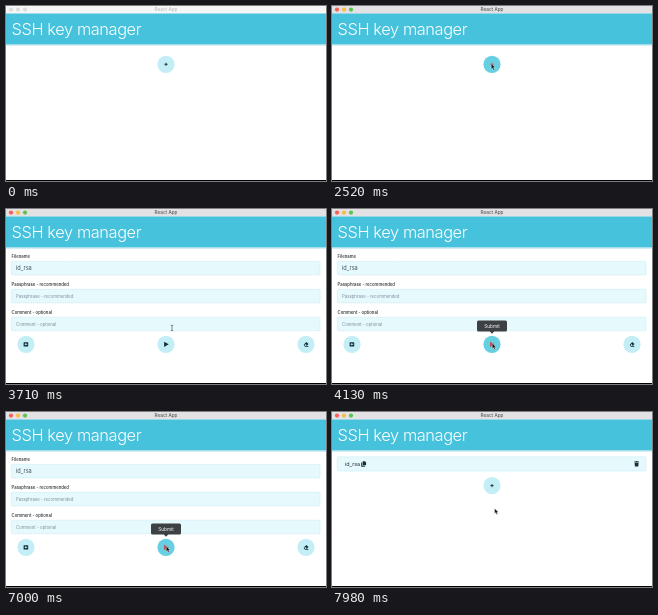
These frames come from a looping animation (320 px wide and 175 px high, 8000 ms). An HTML page:

```html
<!DOCTYPE html>
<html lang="en">
<head>
<meta charset="utf-8">
<title>SSH key manager</title>
<style>
  html, body { margin: 0; width: 100%; height: 100%; overflow: hidden; background: #fff; }
  svg { display: block; width: 100vw; height: 100vh; }
  text { font-family: Inter, "Liberation Sans", sans-serif; fill: #25292c; }
  .title { font-size: 16.4px; font-weight: 300; letter-spacing: -.42px; fill: #fff; }
  .label { font-size: 4.25px; font-weight: 500; }
  .hint { font-size: 4.3px; fill: #7f9097; }
  .value { font-size: 5.6px; fill: #42525a; }
  .box { fill: #e6f9fd; stroke: #b5e5ee; stroke-width: .6; stroke-dasharray: 1.2 .8; }
  .btn { fill: #c3eef6; }
  .ink { fill: #12303b; }
</style>
</head>
<body>
<svg viewBox="0 0 320 175" preserveAspectRatio="none">
  <defs>
    <linearGradient id="shade" x1="0" y1="0" x2="0" y2="1">
      <stop offset="0" stop-color="#a9dce8"/>
      <stop offset="1" stop-color="#fff"/>
    </linearGradient>
  </defs>
  <rect width="320" height="175" fill="#fff"/>
  <rect id="bar" width="320" height="7.5"/>
  <g id="lights"></g>
  <text id="caption" x="160" y="5.4" text-anchor="middle" font-size="4.7"></text>
  <rect y="7.5" width="320" height="31" fill="#47c2dc"/>
  <rect y="38.5" width="320" height="2" fill="url(#shade)"/>
  <text class="title" x="5.6" y="29.3">SSH key manager</text>

  <g id="form">
    <g id="fields"></g>
    <circle class="btn" cx="20" cy="135.3" r="8.6"/>
    <rect class="ink" x="17.6" y="133.2" width="4.6" height="4.2" rx=".5"/>
    <path d="M18.5 135.3l1.5-1.2v.7h1.3v1h-1.3v.7z" fill="#c3eef6"/>
    <circle id="submit" cx="160" cy="135.3" r="8.6"/>
    <path id="play" d="M158.1 132.7l4.6 2.6-4.6 2.6z"/>
    <circle class="btn" cx="300" cy="135.3" r="8.6"/>
    <path class="ink" d="M297.7 135.8l2.6-2.7 2.2 2-1.8 1.9h1.7v.7h-3.4z"/>
    <path d="M298.6 135.8l.8-.8 1.3 1.2-.8.8h-.5z" fill="#c3eef6"/>
    <g id="tip">
      <path d="M146.5 111.5h27q1.5 0 1.5 1.5v8q0 1.5-1.5 1.5h-11.3l-2.2 2.3-2.2-2.3h-11.3q-1.5 0-1.5-1.5v-8q0-1.5 1.5-1.5z" fill="#3d4144"/>
      <text x="160" y="118.8" text-anchor="middle" font-size="4.75" style="fill:#fff">Submit</text>
    </g>
  </g>

  <g id="row">
    <rect class="box" x="5.3" y="44.8" width="308.8" height="14.2" rx="1"/>
    <text class="value" x="13" y="53.8" style="font-size:5.4px;fill:#25292c">id_rsa</text>
    <path class="ink" d="M30.7 49.2h2.2l1.2 1.2v2.9h-3.4zM29.2 50.4h1v3.4h2.7v.9h-3.7z"/>
    <path class="ink" d="M302.2 49.5h1.4l.4-.6h1.2l.4.6h1.4v.8h-4.8zM302.6 50.7h4l-.3 3.9h-3.4z"/>
  </g>
  <g id="add">
    <circle id="addFace" r="8.6"/>
    <path id="plus" d="M-1.6 0h3.2M0-1.6v3.2" stroke-width=".9"/>
  </g>

  <path id="arrow" d="M0 0v5.3l1.2-1.1.9 2 1-.4-.9-2h1.7z" fill="#111" stroke="#fff" stroke-width=".35"/>
  <path id="beam" d="M-1.2-2.8q1.2 0 1.2.7v4.2q0 .7-1.2.7M1.2-2.8q-1.2 0-1.2.7M1.2 2.8q-1.2 0-1.2-.7" fill="none" stroke="#30383c" stroke-width=".6"/>
  <rect y="174" width="320" height="1" fill="#000"/>
</svg>
<script>
const LOOP = 8000, STEP = 70;
const FIELDS = [
  ["Filename", "id_rsa", "value"],
  ["Passphrase - recommended", "Passphrase - recommended", "hint"],
  ["Comment - optional", "Comment - optional", "hint"]
];
// time, x, y of the pointer tip
const PATH = [
  [490, 162.5, 162], [770, 160.5, 78], [980, 160.5, 77.5], [1540, 159.3, 56],
  [2660, 159.3, 57.8], [3080, 159.3, 57.8], [3430, 168, 84], [3710, 166, 119],
  [3920, 160.3, 134.4], [7560, 160.3, 134.4], [7980, 162.6, 96.4]
];
const $ = id => document.getElementById(id);
const clamp = v => Math.max(0, Math.min(1, v));
const ramp = (t, a, b) => clamp((t - a) / (b - a));
const ease = k => k * k * (3 - 2 * k);
const set = (id, name, value) => $(id).setAttribute(name, value);
const show = (id, on) => set(id, "visibility", on ? "visible" : "hidden");
const mix = (a, b, k) => `rgb(${a.map((v, i) => Math.round(v + (b[i] - v) * k))})`;

const PALE = [195, 238, 246], DEEP = [103, 207, 226];
const INK = [18, 48, 59], RED = [205, 67, 72];

$("fields").innerHTML = FIELDS.map(([label, text, kind], i) => {
  const y = 49.3 + i * 27.9;
  return `<text class="label" x="5.6" y="${y}">${label}</text>
    <rect class="box" x="5.3" y="${y + 3.1}" width="308.8" height="13.6" rx="1"/>
    <text class="${kind}" x="10" y="${y + (i ? 11.5 : 12)}">${text}</text>`;
}).join("");
$("lights").innerHTML = [5, 12, 19].map(x => `<circle cx="${x}" cy="3.6" r="2.1"/>`).join("");

function pointer(t) {
  const n = PATH.findIndex(p => p[0] > t);
  if (n < 0) return PATH[PATH.length - 1].slice(1);
  if (n === 0) return PATH[0].slice(1);
  const a = PATH[n - 1], b = PATH[n];
  const k = ease(ramp(t, a[0], b[0]));
  return [a[1] + (b[1] - a[1]) * k, a[2] + (b[2] - a[2]) * k];
}

function draw(time) {
  const t = Math.floor(time / STEP) * STEP;
  const active = t >= 1610, form = t >= 2660 && t < 7070, list = t >= 7070;

  set("bar", "fill", active ? "#e3e1e3" : "#f6f6f6");
  $("caption").textContent = "React App";
  $("caption").style.fill = active ? "#454545" : "#b4b4b4";
  [..."012"].forEach(i => $("lights").children[i].setAttribute("fill",
    active ? ["#f9605a", "#f8bd45", "#5ac452"][i] : "#dcdcdc"));

  show("form", form);
  show("row", list);
  show("add", !form);
  set("add", "transform", `translate(160 ${list ? 73.6 : 58.3})`);
  const over = list ? 0 : ramp(t, 1750, 2100);
  set("addFace", "fill", mix(PALE, DEEP, over));
  set("plus", "stroke", mix(INK, RED, over));

  const hover = ramp(t, 3850, 4060);
  set("submit", "fill", mix(PALE, DEEP, hover));
  set("play", "fill", mix(INK, RED, hover));
  set("tip", "opacity", ramp(t, 3920, 4130));

  const [x, y] = pointer(t);
  const typing = form && [52, 80, 108].some(top => y > top && y < top + 14);
  show("arrow", t >= 490 && !typing);
  show("beam", typing);
  for (const id of ["arrow", "beam"]) set(id, "transform", `translate(${x} ${y})`);
}

const start = performance.now();
function tick() {
  draw((performance.now() - start) % LOOP);
  requestAnimationFrame(tick);
}
draw(0);
requestAnimationFrame(tick);
</script>
</body>
</html>
```
